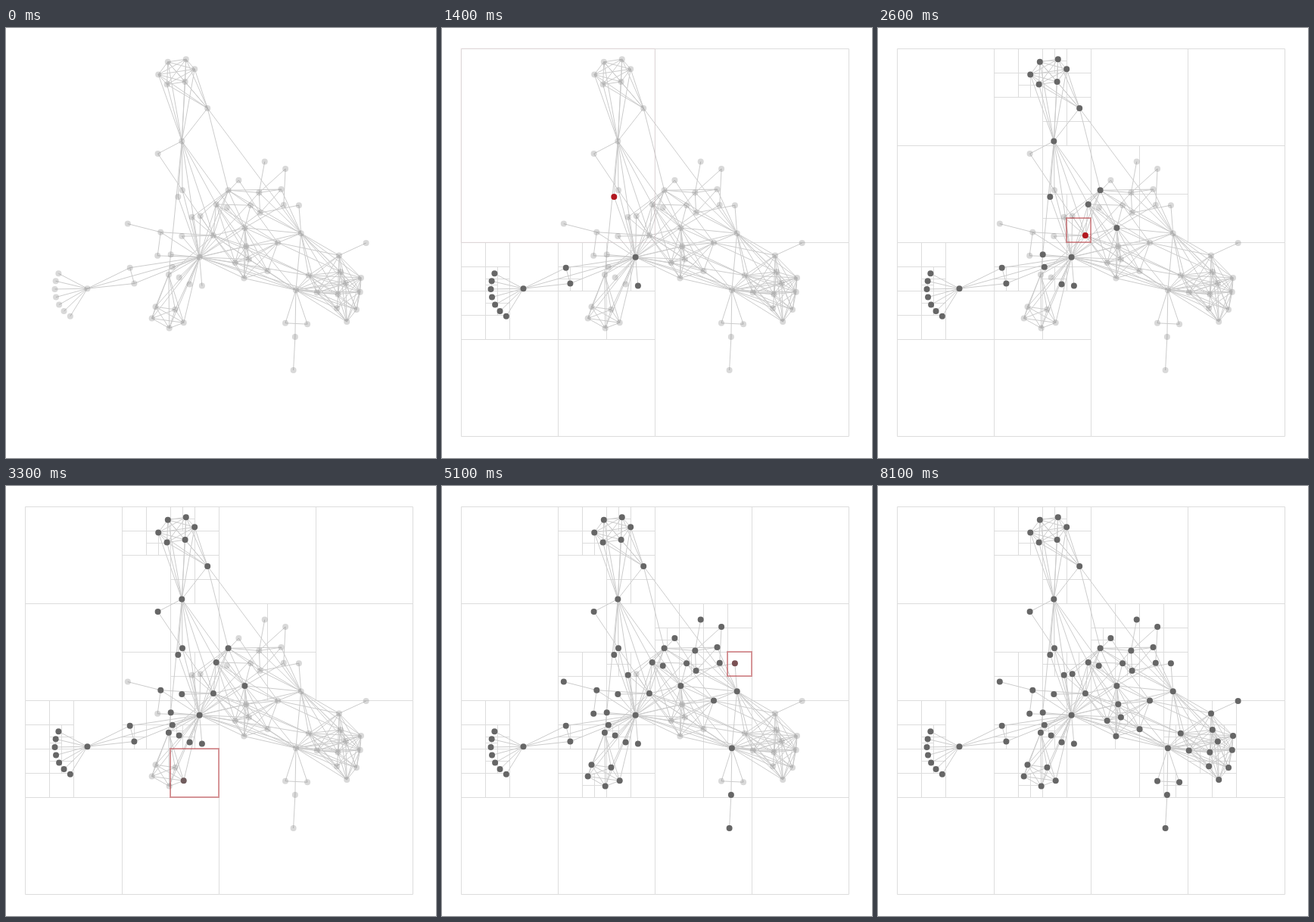
Animation, 568 px wide and 568 px high, one loop 8.2 s. Source, as an HTML page with a canvas:

```html
<!DOCTYPE html>
<html lang="en">
<head>
<meta charset="utf-8">
<title>Quadtree construction</title>
<style>
html, body { margin: 0; width: 100%; height: 100%; overflow: hidden; background: #fff; }
canvas { display: block; }
</style>
</head>
<body>
<canvas id="stage" width="568" height="568"></canvas>
<script>
const ctx = document.getElementById('stage').getContext('2d');
const LOOP = 8200, START = 500;
const ROOT = { x: 25.5, y: 27.5, size: 512 };

const nodes = [];
const span = (a, b) => Array.from({ length: b - a + 1 }, (_, i) => a + i);

// Key points, numbered upwards from `first`
const place = (first, ...points) => points.forEach((p, i) => { nodes[first + i] = p; });

// Spreads ids around an ellipse given by its centre and two half-axes
function ring(ids, [cx, cy], [ax, ay], [bx, by], degrees = 360 / ids.length) {
  ids.forEach((id, i) => {
    const a = i * degrees * Math.PI / 180, c = Math.cos(a), s = Math.sin(a);
    nodes[id] = [cx + ax * c + bx * s, cy + ay * c + by * s];
  });
}

place(0, [107.5, 344.2]);
place(2, [163.7, 316.7], [169.4, 337.5]);
place(11, [255.6, 302.7], [227.3, 222.9]);
place(16, [266.2, 106]);
place(23, [232.3, 149.4], [277.7, 232.9], [315.4, 263.9], [293.6, 214.3], [273.9, 274.1],
  [204.3, 269.7], [214.9, 325.8], [200.6, 166], [233, 214.3]);
place(33, [232.3, 275.1]);
place(39, [366.8, 233.8], [291.7, 237.6], [359, 283.6], [323.1, 234.2], [245.7, 249.8],
  [200.2, 300.8], [160.8, 258.6], [379.6, 452], [381.9, 408], [382.9, 346.2]);
place(49, [335.6, 244.1], [307.4, 201.1], [334.3, 217.5], [369.1, 186.1], [341.7, 176.6],
  [363.5, 213.1], [389.7, 271.2], [386.9, 234.2]);
place(57, [440, 300.4], [399.8, 326.8], [438.3, 351.7], [463, 372], [448.8, 337.4],
  [441.8, 322], [467.8, 348.7], [410.7, 349.6], [469, 329.9], [450.2, 388], [475.6, 284]);
place(68, [302.7, 310], [320.9, 305.6], [317.3, 288.3], [314.4, 330.5], [256.7, 248.3],
  [369, 389.8], [398.1, 391.2], [345.6, 321.2], [437.1, 370.2]);

ring([5, 4, 6, 1, 7, 8, 9], nodes[0], [-38.1, -19.9], [-19.9, 38.1], 14.3);
ring([10, 14, 32, 15, 13], nodes[11], [3.3, 37.9], [-37.9, 3.3], 25);
ring(span(17, 22), [225.2, 57.9], [-11.4, -13.1], [21.1, -11.7]);
ring([34, 38, 37, 35, 36], [212.8, 381.9], [21.9, 7.4], [-4.1, 13]);

const links = [];
const join = (as, bs) => [as].flat().forEach(a => [bs].flat().forEach(b => links.push([a, b])));
const clique = ids => ids.forEach((a, i) => join(a, ids.slice(i + 1)));
const gang = span(68, 71), court = span(34, 38);

join(0, span(1, 9));
join(2, 3);
join(11, [0, 2, 3, 10, span(12, 15), span(23, 29), span(31, 33), court, 43, 44, 48, 49, 51, 55, 58, 64, 72].flat());
clique(span(16, 23));
clique([29, ...court]);
clique(span(24, 27));
join(23, [12, 24, 25, 27, 29, 30, 31]);
join([24, 25, 42], 41);
join([24, 25], 42);
join(24, [50, 68, 69, 70]);
join(25, [39, 40, 48, 55]);
join(26, [16, 43, 49, 51, 54, 55, 72]);
join(27, [28, 29, 31, 33, 43, 48, 58, 72]);
join(28, [44, 45]);
join(30, 31);
join(39, [52, 55]);
join(41, [55, 57, 62]);
join(47, [46, 48]);
join(49, [50, 51, 54, 55, 56]);
join(51, span(52, 55));
join(55, [16, 54, 56, 57]);
join([55, 57], [48, 58, 59, ...span(61, 65)]);
join(57, 67);
clique([48, ...span(58, 66)]);
join(76, [48, 58, ...span(62, 66)]);
clique(gang);
join([11, 25, 27, 41, 75], gang);
join(75, [25, 41]);
join(48, [68, 69, 71, 73, 74, 75]);
join(70, 58);
join(73, 74);

// [ms, insertions]: the whole part is the active point, the rest its phase
const pace = [[START, 0.15], [2100, 22.8], [4200, 42.5], [6100, 71.25], [6700, 76.6], [7200, 77], [LOOP, 77]];
function progress(t) {
  const i = pace.findIndex(p => p[0] > t);
  const [t0, n0] = pace[i - 1], [t1, n1] = pace[i];
  return n0 + (n1 - n0) * (t - t0) / (t1 - t0);
}

const clamp = v => Math.max(0, Math.min(1, v));

function line(x1, y1, x2, y2) {
  ctx.moveTo(x1, y1);
  ctx.lineTo(x2, y2);
}

// Adds the split lines to the path and returns the leaf holding `last`
function divide(pts, last, x, y, size) {
  if (pts.length < 2) return pts[0] === last ? { x, y, size } : null;
  const h = size / 2, cx = x + h, cy = y + h;
  line(cx, y, cx, y + size);
  line(x, cy, x + size, cy);
  let leaf = null;
  for (const right of [false, true])
    for (const low of [false, true]) {
      const part = pts.filter(p => (p[0] >= cx) === right && (p[1] >= cy) === low);
      leaf = divide(part, last, right ? cx : x, low ? cy : y, h) || leaf;
    }
  return leaf;
}

function draw(t) {
  const n = t < START ? -1 : progress(t);
  const active = Math.floor(n), phase = n - active;
  let leaf = null;
  ctx.fillStyle = '#fff';
  ctx.fillRect(0, 0, 568, 568);

  ctx.lineWidth = 1;
  if (n >= 0) {
    ctx.strokeStyle = '#ddd';
    ctx.beginPath();
    ctx.rect(ROOT.x, ROOT.y, ROOT.size, ROOT.size);
    leaf = divide(nodes.slice(0, active + 1), nodes[active], ROOT.x, ROOT.y, ROOT.size);
    ctx.stroke();
  }

  ctx.strokeStyle = '#ccc';
  for (const [a, b] of links) {
    ctx.beginPath();
    line(...nodes[a], ...nodes[b]);
    ctx.stroke();
  }

  const red = clamp(Math.min(phase / 0.45, (1 - phase) / 0.1));
  const mix = (a, b) => Math.round(a + (b - a) * red);
  nodes.forEach(([x, y], i) => {
    ctx.fillStyle = i > active ? 'rgba(102,102,102,.25)'
      : i < active ? '#666'
      : `rgb(${mix(102, 178)},${mix(102, 24)},${mix(102, 32)})`;
    ctx.beginPath();
    ctx.arc(x, y, 4, 0, 2 * Math.PI);
    ctx.fill();
  });

  if (leaf && active < nodes.length) {
    ctx.lineWidth = 2;
    ctx.strokeStyle = `rgba(178,24,32,${0.42 * clamp((0.9 - phase) / 0.15)})`;
    ctx.strokeRect(leaf.x - 0.5, leaf.y - 0.5, leaf.size, leaf.size);
  }
}

const begin = performance.now();
function tick() {
  const t = (performance.now() - begin) % LOOP;
  draw(Math.floor(t / 100) * 100);
  requestAnimationFrame(tick);
}
tick();
</script>
</body>
</html>
```
